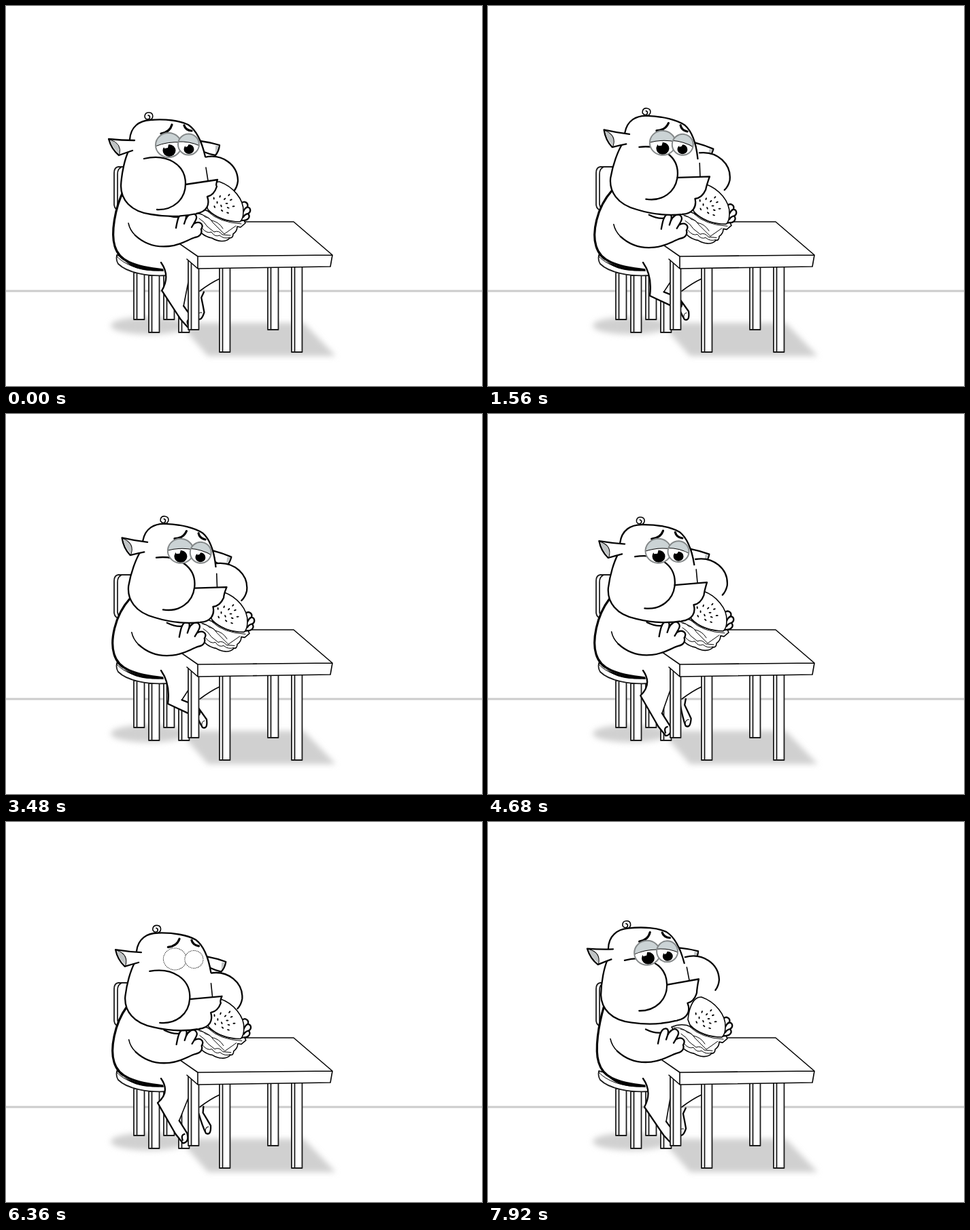
Write an HTML page that moves like this. It is 700 px wide and 560 px high and loops after 8000 ms.

```html
<!DOCTYPE html>
<html lang="en">
<head>
<meta charset="utf-8">
<title>Burger lunch</title>
<style>
html, body { margin: 0; width: 100%; height: 100%; overflow: hidden; background: #fff; }
svg { display: block; width: 100%; height: 100%; }
.ink, .solid { stroke: #050505; stroke-width: 2.3; stroke-linecap: round; stroke-linejoin: round; }
.ink { fill: none; }
.solid, .fill { fill: #fff; }
.wood { fill: #fff; stroke: #1c1c1c; stroke-width: 1.8; stroke-linejoin: round; }
.mid { stroke-width: 1.6; }
.thin { stroke-width: 1; }
.bold { stroke-width: 3.2; }
.grey { fill: #bfc3c4; }
.lid { fill: #cbd3d5; }
.ring { fill: none; stroke: #85898a; stroke-width: 2; }
</style>
</head>
<body>
<svg viewBox="0 0 700 560">
  <defs>
    <filter id="soft" x="-20%" y="-50%" width="140%" height="200%"><feGaussianBlur stdDeviation="4.5"/></filter>
    <clipPath id="eyeL"><ellipse cx="239" cy="205" rx="19" ry="18"/></clipPath>
    <clipPath id="eyeR"><ellipse cx="268.5" cy="204" rx="15.5" ry="15.5"/></clipPath>
  </defs>

  <path d="M0 420H700" stroke="#cbcbcb" stroke-width="2.8"/>
  <g fill="#d0d0d0" filter="url(#soft)">
    <ellipse cx="210" cy="471" rx="56" ry="13"/>
    <path d="M254 467H438L485 516H297Z"/>
  </g>

  <path class="wood" d="M200 237H165Q159 238 159 246V293Q160 300 166 301H200Z"/>
  <path class="ink mid" d="M169 238Q164 240 164 248V292Q165 298 169 300"/>
  <g id="chairLegs"></g>
  <path class="wood" d="M163 367C162 372 163 377 165 380C178 393 208 399 238 397V384Z"/>
  <path class="ink thin" d="M163 369C178 385 206 392 238 390"/>

  <path id="body" class="fill"/>
  <path id="back" class="ink bold"/>
  <path id="rump" d="M161 358C165 377 186 385 232 389C205 393 176 388 161 358Z"/>
  <path class="fill" d="M230 380L250 350H314V402L285 420H262L232 392Z"/>
  <path class="ink mid" d="M314 402Q301 408 285 420"/>
  <g id="farFoot">
    <path class="solid" d="M284 430Q291 448 297 458Q305 461 303 446Q296 436 290 428V419"/>
    <path class="ink thin" d="M296 456Q295 449 300 448"/>
  </g>
  <path id="legFill" class="fill"/>
  <path id="leg" class="ink"/>
  <path id="calf" class="ink mid"/>

  <g id="tableLegs"></g>
  <path class="fill" d="M248 345L300 318H423L480 367L477 384L282 387L264 372Z"/>
  <path class="ink mid" d="M335 318H423L480 367L282 369L246 344M480 367L477 384L282 387V369M282 387L266 373"/>

  <g class="head">
    <path class="solid" d="M286 199Q301 201 314 205Q313 214 308 220Q298 218 291 215Z"/>
    <path class="grey" d="M308 206L313 206L308 218Z"/>
    <g class="face">
      <path class="fill" d="M288 223C318 217 341 236 341 258C341 264 338 270 334 274L300 275Z"/>
      <path class="ink" d="M292 223C318 217 341 234 341 258Q340 267 335 273"/>
    </g>
  </g>

  <g id="burger">
    <path class="solid" d="M346 291C350 286 357 290 355 296C361 298 360 304 356 306C360 311 356 317 346 316M355 296Q351 298 349 303M356 306Q351 307 349 311"/>
    <path class="solid mid" d="M270 303C284 297 293 300 299 303C313 314 330 320 350 316L352 320L345 326L340 325Q340 332 334 336Q334 342 329 342C323 349 311 347 303 342C293 340 283 334 284 326Z"/>
    <path class="ink thin" d="M273 304Q286 303 293 311Q300 312 304 319L321 336L338 324M283 306Q296 309 302 316Q313 318 319 328M284 313Q292 318 296 325L306 333Q313 330 318 337L330 338M288 327Q295 336 302 333Q307 341 314 338Q321 344 329 341M297 303Q313 319 346 321"/>
    <path class="solid mid" d="M294 292C296 270 304 258 314 259C334 266 350 285 349 303Q349 314 344 318C326 318 308 312 297 300Z"/>
    <g id="seeds"></g>
  </g>

  <g id="arm">
    <path class="fill" d="M180 320Q183 333 190 338C204 351 222 356 240 354C258 352 266 345 278 341L288 324L278 307L260 305L252 312L232 306Z"/>
    <path class="ink mid" d="M180 320Q182 330 190 338"/>
    <path class="solid" d="M190 338C204 351 222 356 240 354C258 352 266 345 278 341C285 340 289 335 287 329C292 321 284 316 276 321C278 317 283 311 278 307C274 303 267 308 264 315C266 309 265 304 260 305C254 306 252 316 250 327M276 321L273 326M264 315L262 321"/>
    <path class="ink" d="M232 306Q244 312 254 311"/>
  </g>

  <g class="head">
    <path class="fill" d="M181 197C183 178 196 169 212 168C235 166 256 169 268 175C280 183 288 200 293 222L297 258L295 285L284 305C262 311 235 311 213 307C183 303 169 285 169 265C170 245 175 225 181 212Z"/>
    <path class="ink" d="M182 197C183 178 196 169 212 168C235 166 256 169 268 175C280 183 288 200 293 222"/>
    <path class="ink" d="M180 214C175 225 170 245 169 265C169 285 183 303 213 307C235 311 258 311 280 306"/>
    <path id="lip" class="fill"/>
    <path id="mouth" class="ink"/>
    <g class="face">
      <path class="ink" d="M203 225C236 217 264 233 264 262C264 285 246 301 222 300"/>
      <path class="ink mid" d="M294 238L297 257"/>
    </g>
    <path class="solid" d="M189 198Q170 198 151 196Q155 211 166 220Q177 216 186 213"/>
    <path class="grey" d="M153 198Q170 202 167 218Q157 210 153 198Z"/>
    <path class="ink thin" d="M153 197Q171 202 167 219"/>
    <path class="ink mid" d="M211 168C218 166 217 157 210 157C203 157 202 166 208 167C212 167 213 162 209 161"/>
    <path class="ink bold" d="M228 188Q241 186 244 175M262 176Q264 183 273 184"/>
    <g id="open">
      <g clip-path="url(#eyeL)">
        <path class="fill" d="M219 186H259V224H219Z"/>
        <ellipse cx="240" cy="213" rx="9.5" ry="9"/>
        <path class="fill" d="M231 205L239 204L238 209L233 210Z"/>
        <path class="lid" d="M218 186H259V201Q238 199 218 207Z"/>
        <path class="ink thin" d="M219 207Q238 199 259 201"/>
      </g>
      <ellipse class="ring" cx="239" cy="205" rx="19" ry="18"/>
      <g clip-path="url(#eyeR)">
        <path class="fill" d="M252 187H286V221H252Z"/>
        <ellipse cx="269" cy="211" rx="7.5" ry="7"/>
        <path class="fill" d="M263 203L269 203L267 207L264 208Z"/>
        <path class="lid" d="M252 187H285V206Q270 199 252 200Z"/>
        <path class="ink thin" d="M252 200Q270 199 285 206"/>
      </g>
      <ellipse class="ring" cx="268.5" cy="204" rx="15.5" ry="15.5"/>
    </g>
    <g id="shut" fill="#fff" stroke="#333" stroke-dasharray="1.5 1">
      <ellipse cx="239" cy="205" rx="17" ry="16"/>
      <ellipse cx="267" cy="204" rx="13.5" ry="13"/>
    </g>
  </g>
</svg>
<script>
const LOOP = 8000, STEP = 120, CHEW = 1060;
const $ = id => document.getElementById(id);
const all = sel => document.querySelectorAll(sel);
const set = (el, a) => { for (const k in a) el.setAttribute(k, a[k]); };
const mix = (a, b, k) => a + (b - a) * k;
const smooth = u => u * u * (3 - 2 * u);

// Furniture legs
const post = (x, top, bottom) => `<path class="wood" d="M${x} ${top}h15.5V${bottom}h-15.5ZM${x + 4.5} ${top}V${bottom}"/>`;
$('chairLegs').innerHTML = post(188, 393, 462) + post(232, 395, 462) + post(210, 397, 481) + post(254, 395, 481);
$('tableLegs').innerHTML = post(385, 384, 477) + post(268, 372, 477) + post(314, 384, 510) + post(420, 384, 510);

// Sesame seeds on a squashed spiral
for (let i = 0; i < 13; i++) {
  const a = i * 2.4, r = 5 * Math.sqrt(i + 0.5);
  const x = 321 + r * Math.cos(a), y = 291 + 0.85 * r * Math.sin(a);
  $('seeds').innerHTML += `<ellipse cx="${x}" cy="${y}" rx="2" ry="1" transform="rotate(${i * 67} ${x} ${y})"/>`;
}

// Resting poses: the head is held from `from` to `to`
const POSES = [
  { from: 0, to: 0, tilt: 0, x: 0, y: 0, bite: 0, swing: 0.45 },
  { from: 1560, to: 3480, tilt: 6.8, x: 18.5, y: -4, bite: 6, swing: 1 },
  { from: 5040, to: 6000, tilt: 4, x: 11.5, y: -3, bite: 0.5, swing: 0 },
  { from: 7920, to: LOOP, tilt: -1.8, x: -5, y: -12, bite: 0, swing: 0.5 }
];

// Eases between resting poses, pulling back to chew halfway
function poseAt(t) {
  const i = Math.max(1, POSES.findIndex(p => t <= p.to));
  const a = POSES[i - 1], b = POSES[i];
  const u = Math.min(1, (t - a.to) / (b.from - a.to)), k = smooth(u);
  const nod = Math.sin(Math.PI * u) ** 4;
  return {
    tilt: mix(a.tilt, b.tilt, k) - 3.5 * nod,
    x: mix(a.x, b.x, k) - 3 * nod,
    y: mix(a.y, b.y, u * u) - 1.5 * nod,
    bite: mix(a.bite, b.bite, k) + 4 * nod,
    swing: mix(a.swing, b.swing, k) + 0.2 * nod * (1 - k)
  };
}

// The shin turns about the knee: 0 hangs down, 1 points forward
function drawLegs(swing) {
  const bend = swing ** 3, angle = (58 - 36 * bend) * Math.PI / 180;
  const kx = 222 + 16 * swing, ky = 413 + 14 * swing, len = 70 - 22 * bend;
  const c = Math.cos(angle), s = Math.sin(angle);
  const at = (d, n) => `${kx + d * c + n * s} ${ky + d * s - n * c}`;
  const outer = `M228 378Q242 398 ${at(0, 0)}Q${at(len * 0.4, -1)} ${at(len * 0.75, -2)}L${at(len, 0)}Q${at(len + 4, 9)} ${at(len - 9, 13)}L${at(len - 31, 13)}`;
  set($('legFill'), { d: `${outer}L268 407V380Z` });
  set($('leg'), { d: `${outer}M${at(len - 4, 2)}Q${at(len - 12, 4)} ${at(len - 10, 9)}` });
  set($('calf'), { d: `M${at(len - 31, 13)}L268 407` });
  const tuck = 25 * Math.sin(Math.PI * swing);
  set($('farFoot'), { transform: `translate(${-8 * bend} ${4 * bend}) rotate(${tuck} 286 424)` });
}

function drawFace(t) {
  const up = 5 * Math.cos(2 * Math.PI * t / CHEW) - 5, side = -0.25 * up;
  all('.face').forEach(f => set(f, { transform: `translate(${side} ${up})` }));
  const inner = `${264 + side} ${263 + up}`, corner = `${311 + side} ${256 + up}`;
  const mouth = `M${inner}L${corner}Q${308 + side} ${264 + up / 2} 310 266Q306 279 296 281C300 292 296 303 280 306`;
  set($('mouth'), { d: mouth });
  set($('lip'), { d: `${mouth}L250 296L262 ${245 + up}L296 ${240 + up}L${corner}L${inner}Z` });

  const shut = [3000, 5520, 6360].some(b => t >= b && t < b + 2 * STEP);
  $('open').style.display = shut ? 'none' : '';
  $('shut').style.display = shut ? '' : 'none';
}

function draw(t) {
  const { tilt, x, y, bite, swing } = poseAt(t);
  all('.head').forEach(h => set(h, { transform: `translate(${x} ${y}) rotate(${tilt} 232 200)` }));

  const lean = Math.max(-1, -1.5 * tilt);
  const back = `M${173 + x / 2} 272C${160 + lean} 298 ${154 + lean} 335 ${160 + lean} 354C${166 + lean} 375 186 384 232 389`;
  set($('body'), { d: `${back}L265 375V300L220 260Z` });
  set($('back'), { d: back });
  set($('rump'), { transform: `translate(${lean} 0)` });

  const drop = 0.5 * tilt;
  set($('burger'), { transform: `translate(${bite} ${drop})` });
  set($('arm'), { transform: `translate(${bite * 0.8} ${drop * 0.5})` });
  drawLegs(swing);
  drawFace(t);
}

const start = performance.now();
function tick() {
  const t = (performance.now() - start) % LOOP;
  draw(Math.floor(t / STEP) * STEP);
  requestAnimationFrame(tick);
}
tick();
</script>
</body>
</html>
```
